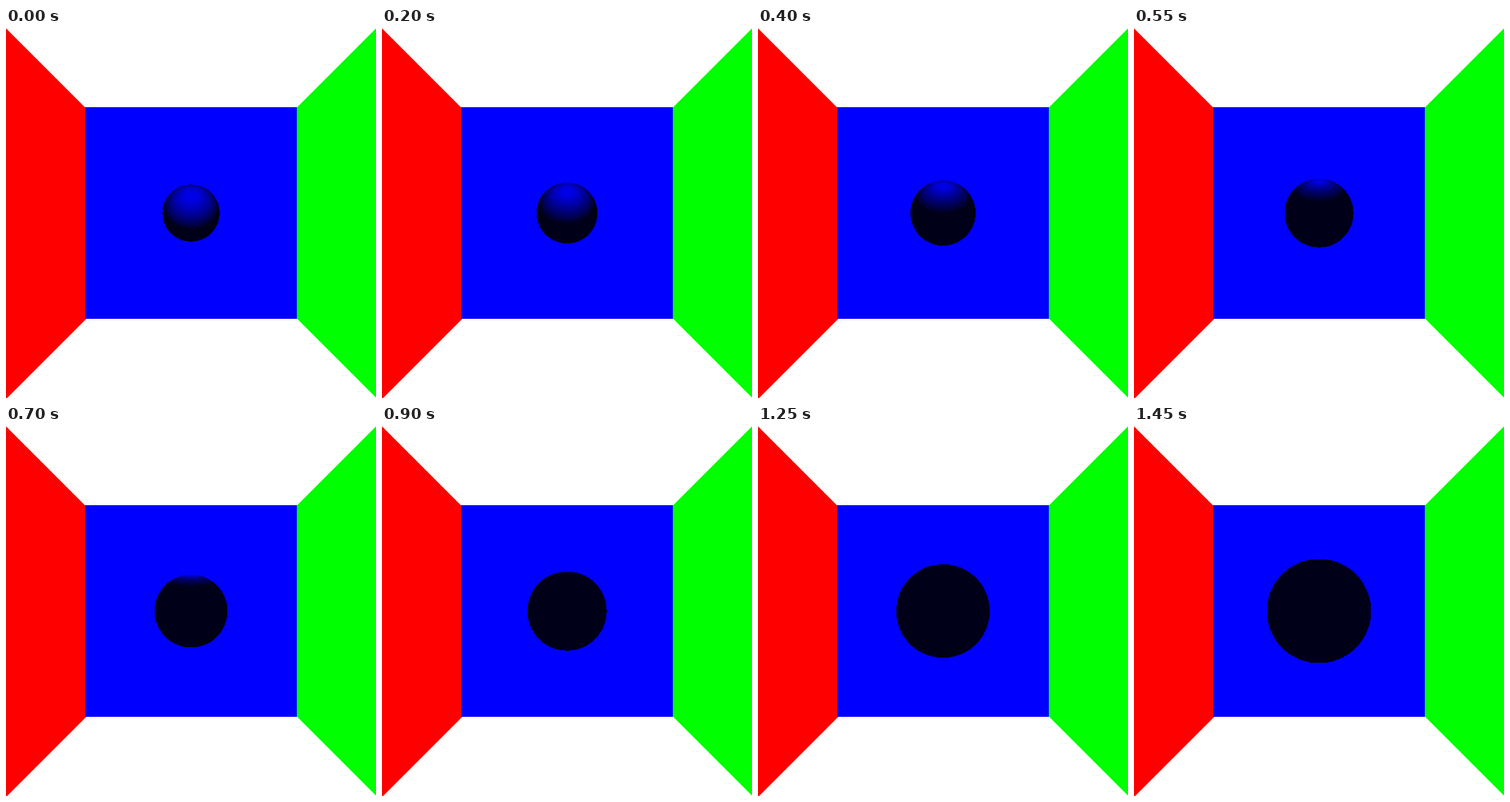
Animation of 500 by 500 pixels, one loop 1500 ms. Source, as an HTML page with a canvas:

```html
<!DOCTYPE html>
<html>
<head>
<meta charset="utf-8">
<style>
html, body { margin: 0; width: 100%; height: 100%; overflow: hidden; background: #fff; }
canvas { display: block; width: 500px; height: 500px; }
</style>
</head>
<body>
<canvas id="stage" width="500" height="500"></canvas>
<script>
const SIZE = 500, MID = 250, WALL = 143, FOCAL = 250;
const STEP = 50, STEPS = 30, REACH = 72;
const START = 6.56, SPEED = 0.099;   // distance to the unit sphere, and its approach per step
const LIGHT = { up: 1.15, front: 1.8 };
const AMBIENT = 24, DIFFUSE = 211, SOFTNESS = 0.8;
const SHIFT = 0.45;                  // sub-pixel offset of the sphere's axis

const ctx = document.getElementById('stage').getContext('2d');

// On the diagonals each wall wins over the next one round the room.
function roomColor(u, v) {
  if (u >= -WALL && u < WALL && v >= -WALL && v < WALL) return [0, 0, 255];
  if (-u > -v && -u >= v) return [255, 0, 0];
  if (u >= -v && u > v) return [0, 255, 0];
  return [255, 255, 255];
}

function drawRoom() {
  const img = ctx.createImageData(SIZE, SIZE);
  for (let y = 0; y < SIZE; y++) {
    for (let x = 0; x < SIZE; x++) {
      img.data.set([...roomColor(x - MID, y - MID), 255], (y * SIZE + x) * 4);
    }
  }
  ctx.putImageData(img, 0, 0);
}

// Diffuse light at the point where the ray through (u, v) meets the sphere, or null.
function shade(u, v, dist, front) {
  const dx = u / FOCAL, dy = -v / FOCAL;
  const a = dx * dx + dy * dy + 1;
  const disc = dist * dist - a * (dist * dist - 1);
  if (disc < 0) return null;
  const t = (dist - Math.sqrt(disc)) / a;
  const nx = dx * t, ny = dy * t, nz = dist - t;
  const lx = -nx, ly = LIGHT.up - ny, lz = front - nz;
  const cos = (nx * lx + ny * ly + nz * lz) / Math.hypot(lx, ly, lz);
  return Math.max(0, cos) ** SOFTNESS;
}

function drawSphere(step) {
  const side = 2 * REACH + 1;
  const img = ctx.createImageData(side, side);
  const dist = START - SPEED * step, front = LIGHT.front - SPEED * step;
  for (let y = 0; y < side; y++) {
    for (let x = 0; x < side; x++) {
      const d = shade(x - REACH + SHIFT, y - REACH + SHIFT, dist, front);
      const blue = d === null ? 255 : AMBIENT + DIFFUSE * d;
      img.data.set([0, 0, blue, 255], (y * side + x) * 4);
    }
  }
  ctx.putImageData(img, MID - REACH, MID - REACH);
}

let shown = -1;
const begin = performance.now();

function tick() {
  const step = Math.floor((performance.now() - begin) / STEP) % STEPS;
  if (step !== shown) drawSphere(shown = step);
  requestAnimationFrame(tick);
}

drawRoom();
tick();
</script>
</body>
</html>
```
